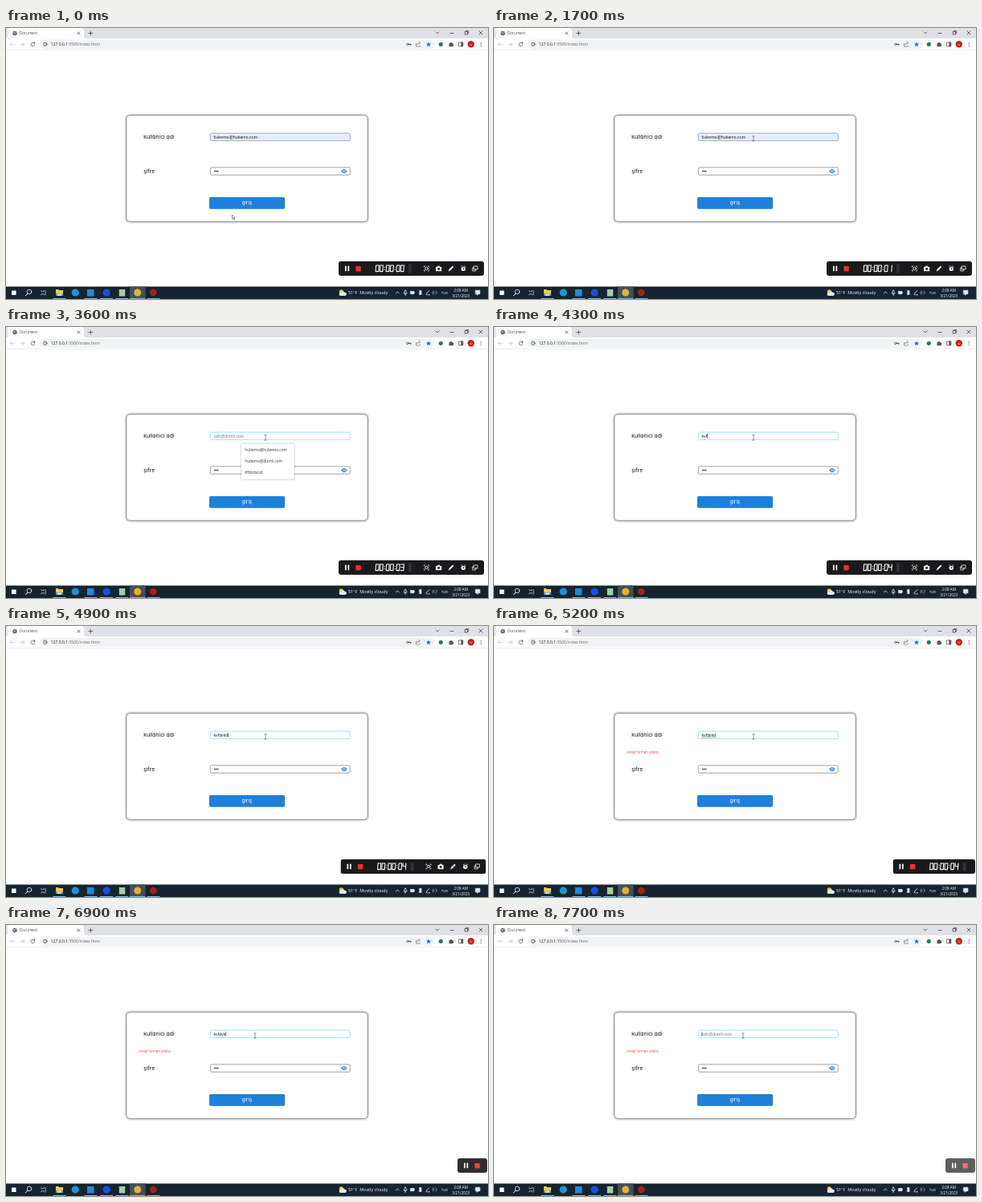
These frames come from a looping animation (600x338 px, 8000 ms). An HTML page:

```html
<!DOCTYPE html>
<html lang="tr">
<head>
<meta charset="utf-8">
<title>Document</title>
<style>
html, body { margin: 0; width: 100%; height: 100%; overflow: hidden; background: #fff; }
svg { display: block; width: 100vw; height: 100vh; }
text { font-family: "Open Sans", sans-serif; white-space: pre; }
.form { font-family: Inter, sans-serif; font-feature-settings: "cv11"; fill: #111; }
.input { font: 5.24px "Liberation Sans", Arial, sans-serif; }
.line { fill: none; stroke-width: .8; stroke-linecap: round; stroke-linejoin: round; }
#card { filter: drop-shadow(0 0 1.4px rgba(0,0,0,.6)); }
#list rect { filter: drop-shadow(0 .6px 1.2px rgba(0,0,0,.35)); }
</style>
</head>
<body>
<svg viewBox="0 0 600 338">
  <defs><clipPath id="barClip"><rect id="clipBox" y="291" height="18" rx="3"/></clipPath></defs>
  <rect width="600" height="338" fill="#fff"/>

  <!-- browser -->
  <rect width="600" height="13" fill="#dee1e6"/>
  <path d="M0 13q2 0 2-2V3q0-3 3-3H94q3 0 3 3v8q0 2 2 2z" fill="#fff"/>
  <circle cx="11" cy="6.5" r="2.7" fill="#50555a"/>
  <path class="line" d="M9.3 5.5l1.4.7.4 1.4M11.5 4.7l1 1.2" stroke="#fff"/>
  <text x="17" y="8.2" font-size="4.5" fill="#45494d">Document</text>
  <g class="line" stroke="#44484c">
    <path d="M89 5l3 3m0-3l-3 3M102.800 6.500h5m-2.500-2.500v5"/>
    <path d="M535 5l2 2 2-2M553 6.500h4M571.500 4.500h3v3.500h-3zM572.700 4.500v-1h3v3.500h-1M589 4l4 4m0-4l-4 4"/>
  </g>
  <rect x="42" y="14.500" width="491" height="11.500" rx="5.700" fill="#f1f3f4"/>
  <path d="M0 27.300H600" stroke="#e3e5e8" stroke-width=".7"/>
  <g class="line" stroke="#bfc2c5"><path d="M10.500 20.300h-5m2-2l-2 2 2 2M18 20.300h5m-2-2l2 2-2 2"/></g>
  <g class="line" stroke="#54585c">
    <path d="M35.300 18.800a2.400 2.400 0 1 0 .4 2.200M35.700 17.500v1.800h-1.800"/>
    <circle cx="48.800" cy="20.300" r="2.300"/><path d="M48.800 20.200v1.100M48.800 19v.1"/>
    <circle cx="499.800" cy="20.300" r="1.300"/><path d="M501.200 20.300h2.600v1" stroke-width="1.200"/>
    <path d="M511.500 19.500h-1v3.600h4.700v-1.500M511.700 21.200q.3-2.600 3.600-2.600m-1.300-1.400l1.500 1.400-1.500 1.400" stroke="#8a8e92"/>
    <path d="M564 17.800h4.800v5H564z"/>
  </g>
  <path d="M566.500 17.800h2.300v5h-2.300z" fill="#44484c"/>
  <text x="55.800" y="22.200" font-size="5.040" fill="#202124">127.0.0.1<tspan fill="#666a6e">:5500/index.html</tspan></text>
  <path d="M526 17.200l.9 2.200 2.300.1-1.800 1.500.7 2.300-2.100-1.300-2.100 1.300.7-2.300-1.800-1.500 2.300-.1z" fill="#1a73e8"/>
  <circle cx="541.300" cy="20.300" r="2.600" fill="#2d7a58"/>
  <path d="M551.500 18.800h1.600a1 1 0 0 1 2 0h1.300v1.500a1 1 0 0 1 0 2v1h-4.900z" fill="#54585c"/>
  <circle cx="578.800" cy="20.300" r="4.200" fill="#d01f1f"/>
  <text x="578.800" y="21.800" font-size="4" text-anchor="middle" fill="#fff">o</text>
  <g fill="#54585c"><circle cx="591.300" cy="18.300" r=".65"/><circle cx="591.300" cy="20.300" r=".65"/><circle cx="591.300" cy="22.300" r=".65"/></g>

  <!-- form -->
  <rect id="card" x="150" y="109" width="300" height="132.300" rx="4" fill="#fff" stroke="#8c8c8c" stroke-width=".7"/>
  <text class="form" x="171.300" y="138" font-size="6.800">kullanici adi</text>
  <text class="form" x="171.300" y="180.800" font-size="6.600">şifre</text>
  <text id="error" class="form" x="165.300" y="158.600" font-size="4.250" style="fill:#f34a4a">email formatı yanlış</text>
  <rect id="field" x="254.300" y="131.200" width="174" height="9.400" rx="1.300" stroke-width=".8"/>
  <text id="value" class="input" x="258.500" y="137.600"></text>
  <path id="squiggle" class="line" stroke="#e33" style="stroke-width:.5"/>
  <path id="caret" stroke="#222" stroke-width=".6"/>
  <rect x="254.300" y="173.900" width="174" height="9.400" rx="1.300" fill="#fff" stroke="#8d8d8d" stroke-width=".8"/>
  <g fill="#111"><circle cx="259.800" cy="178.600" r=".8"/><circle cx="261.700" cy="178.600" r=".8"/><circle cx="263.600" cy="178.600" r=".8"/></g>
  <path d="M417.200 178.600q3.700-5.400 7.400 0q-3.700 5.400-7.400 0z" fill="#1c7fd9"/>
  <circle cx="420.900" cy="178.600" r="1.700" fill="#fff"/><circle cx="420.900" cy="178.600" r="1" fill="#1c7fd9"/>
  <rect x="253" y="211" width="94.200" height="14.800" rx="1.800" fill="#1f80d9"/>
  <text class="form" x="300" y="220.300" font-size="6.100" text-anchor="middle" style="fill:#fff">giriş</text>
  <g id="list" font-size="4.780" fill="#333">
    <rect x="293" y="145.700" width="65.700" height="44" rx="1" fill="#fff"/>
    <text x="297.300" y="154.800">hubemo@hubemo.com</text>
    <text x="297.300" y="168.800">hubemo@dumli.com</text>
    <text x="297.300" y="182.800">dfdcdscsd</text>
  </g>

  <!-- taskbar -->
  <rect y="322.500" width="600" height="15.500" fill="#16242f"/>
  <rect x="154" y="322.500" width="19.500" height="15.500" fill="#42505a"/>
  <rect x="7" y="327.500" width="5.500" height="5.500" fill="#fff"/>
  <g class="line" stroke="#f2f4f5">
    <circle cx="29" cy="329" r="2.800"/><path d="M27 331.200l-2.600 2.700" stroke-width="1"/>
    <path d="M44 327.500v1.200h3.500v-1.200M44 333v-1.200h3.500v1.200M49.300 327.500v5.500" stroke="#b5bdc3"/>
  </g>
  <path d="M62 326h3l1 1h5v7h-9z" fill="#f6c64f"/><path d="M62 331h9v3h-9z" fill="#4a9fe0"/><path d="M64 331.500h5v2.500h-5z" fill="#fbe08a"/>
  <circle cx="86.300" cy="330" r="4.600" fill="#1f94d2"/>
  <rect x="101" y="326" width="8.500" height="8.500" fill="#2489d4"/>
  <circle cx="125.200" cy="330" r="4.600" fill="#1b4fe0"/>
  <rect x="140.800" y="326" width="7.500" height="8.500" fill="#a4cfa4"/>
  <circle cx="163.800" cy="330" r="4.500" fill="#e6b030"/>
  <circle cx="183.300" cy="330" r="4.300" fill="#a32419"/>
  <path d="M58.500 337.500h16M97.500 337.500h16M117 337.500h16M136.500 337.500h16M154 337.500h19.500M175.500 337.500h16" stroke="#79bdee"/>
  <circle cx="417.300" cy="328.800" r="2.600" fill="#f4b942"/>
  <path d="M416.500 334a2 2 0 0 1 .2-4a2.700 2.700 0 0 1 5-.2a2.100 2.100 0 0 1 .3 4.200z" fill="#dfe7ee"/>
  <g fill="#fff">
    <text x="426" y="332.300" font-size="5.350">51°F</text>
    <text x="440.200" y="332.300" font-size="5.500">Mostly cloudy</text>
    <text x="541.800" y="331.900" font-size="4.300">TUR</text>
    <text x="566.200" y="328.500" font-size="4.600" text-anchor="middle">2:08 AM</text>
    <text x="566.200" y="336" font-size="4.650" text-anchor="middle">3/21/2023</text>
  </g>
  <g class="line" stroke="#e4e8eb">
    <path d="M485.300 331l2-2 2 2"/>
    <rect x="496" y="327.300" width="2.200" height="4" rx="1"/><path d="M495 330.500q2 3.500 4.200 0M497.100 332.500v1"/>
    <path d="M503.800 328.500h4v3.200h-4zM508.500 329.800v.7" fill="#e4e8eb"/>
    <path d="M515 327.500h2v5h-2z" fill="#e4e8eb"/>
    <path d="M523 332.800l1-2.500 3-2.600M524.500 332.800h3"/>
    <path d="M531.500 332a4 4 0 0 1 0-4M533 331.200a2.500 2.500 0 0 1 0-2.400M535 328l1.500 2-1.500 2" stroke="#98a3aa"/>
    <path d="M584.700 327.300h5.200v4.500h-2.200l-1.200 1.500v-1.500h-1.800z" fill="#e4e8eb"/>
  </g>

  <!-- recorder -->
  <g id="bar" clip-path="url(#barClip)">
    <rect id="back" y="291" height="18" fill="#1a1a1c"/>
    <g id="tools">
      <path d="M422 296.800h1.700v6.500H422zM425.500 296.800h1.700v6.500h-1.700z" fill="#fff"/>
      <rect x="435.400" y="297" width="6.400" height="6.400" rx=".8" fill="#ec2f35"/>
      <path id="digits" class="line" stroke="#fff" style="stroke-width:1.050" transform="translate(460.600 296) skewX(-4)"/>
      <rect x="501" y="294.500" width="4" height="11" fill="#303033"/>
      <g class="line" stroke="#eee">
        <circle cx="523.500" cy="300" r="1.800"/>
        <path d="M520.500 298v-1h1M525.500 297h1v1M526.500 302v1h-1M521.500 303h-1v-1"/>
        <path d="M551.300 302.800l1-2.200 3.700-3.500 1 1-3.700 3.700z" fill="#eee"/>
        <path d="M582.500 297h4.500v4h-4.500zM582.500 299h-1.800v4h4v-2"/>
      </g>
      <path d="M535 298h1.800l.7-1.200h2.200l.7 1.200h1.800v5.200H535z" fill="#eee"/><circle cx="538.600" cy="300.500" r="1.400" fill="#1a1a1c"/>
      <circle cx="569.300" cy="300.400" r="2.700" fill="#eee"/><path class="line" d="M566.800 297.600l1-.7M571.800 297.600l-1-.7" stroke="#eee"/>
      <path class="line" d="M569.300 299v1.500h1" stroke="#1a1a1c"/>
    </g>
  </g>

  <path id="arrow" d="M0 0v5.200l1.200-1.100.9 1.900.9-.4-.9-1.800h1.700z" fill="#fff" stroke="#222" stroke-width=".5"/>
  <path id="beam" class="line" d="M-1.200-3h2.400M0-3v6M-1.200 3h2.400" stroke="#555" style="stroke-width:.6"/>
</svg>
<script>
const LOOP = 8000, TYPED = "kvfdvkd";
const $ = id => document.getElementById(id);
const set = (id, attrs) => { for (const k in attrs) $(id).setAttribute(k, attrs[k]); };
const show = (id, on) => set(id, { visibility: on ? "visible" : "hidden" });
const place = (id, x, y) => set(id, { transform: `translate(${x} ${y})` });
const clamp = v => Math.max(0, Math.min(1, v));
const ease = (t, from, to) => { const p = clamp((t - from) / (to - from)); return p * p * (3 - 2 * p); };
const mix = (a, b, p) => a + (b - a) * p;

// Seven-segment strokes: top, upper right, lower right, bottom, lower left, upper left, middle
const SEGMENTS = ["0 0h3.6", "3.6 0v3.8", "3.6 3.8v3.8", "0 7.6h3.6", "0 3.8v3.8", "0 0v3.8", "0 3.8h3.6"];
const LIT = ["012345", "12", "01346", "01236", "1256"];

function clockPath(sec) {
  let d = "";
  [0, 0, 0, 0, 0, sec].forEach((n, i) => {
    const x = (i >> 1) * 13 + (i % 2) * 5.2;
    for (const s of LIT[n]) {
      const [, sx, rest] = SEGMENTS[s].match(/^(\S+) (.*)$/);
      d += `M${x + +sx} ${rest}`;
    }
  });
  for (const x of [11, 24]) d += `M${x} 2.300v.2M${x} 5.300v.2`;
  return d;
}

function typedCount(t) {
  if (t < 4300) return 0;
  if (t < 6900) return Math.min(7, 3 + 2 * Math.floor((t - 4300) / 100));
  return Math.max(0, 6 - Math.floor((t - 6900) / 100));
}

function caretOn(t) {
  if (t < 2000) return false;
  if (t >= 6900 || (t >= 4300 && t < 4600)) return true;
  const start = t < 3100 ? 2000 : t < 4300 ? 3100 : 4600;
  return (t - start) % 1000 < 500;
}

function drawField(t) {
  const filled = t < 3100, focus = t >= 2000;
  const text = filled ? "hubemo@hubemo.com" : TYPED.slice(0, typedCount(t));
  $("value").textContent = text || "ozb@dumli.com";
  set("value", { fill: text ? "#222" : "#777" });
  set("field", { fill: filled ? "#e5effb" : "#fff", stroke: focus ? "#86e4f0" : "#929ba5" });
  const end = 258.5 + (text ? $("value").getComputedTextLength() : 0);
  set("caret", { d: `M${end + .3} 133v5.800` });
  show("caret", caretOn(t));
  let wave = "M258.500 139";
  for (let x = 258.5; x < end - 1; x += 2) wave += "q.5-.8 1 0t1 0";
  set("squiggle", { d: wave });
  show("squiggle", t >= 5000 && t < 6900);
  show("error", t >= 5000);
  show("list", t >= 3100 && t < 4300);
}

function drawPointer(t) {
  const beam = t >= 1300, go = ease(t, 200, 700), nudge = ease(t, 1100, 1300);
  show("arrow", !beam);
  show("beam", beam);
  place("arrow", mix(281.5, 325.5, go) - 2 * nudge, mix(233, 141, go) - 3 * nudge);
  place("beam", mix(323, 310, ease(t, 6000, 6700)), 138);
}

function drawRecorder(t) {
  const dx = 148 * ease(t, 4850, 5500), x = 414 + dx;
  const width = Math.min(595 + dx, 599) - x;
  set("clipBox", { x, width });
  set("back", { x, width });
  place("tools", dx, 0);
  set("digits", { d: clockPath(Math.max(0, Math.min(4, Math.floor((t - 300) / 1000)))) });
  set("bar", { opacity: 1 - .3 * clamp((t - 6600) / 1000) });
}

function frame() {
  const t = Math.floor(performance.now() % LOOP / 100) * 100;
  drawField(t);
  drawPointer(t);
  drawRecorder(t);
  requestAnimationFrame(frame);
}
frame();
</script>
</body>
</html>
```
